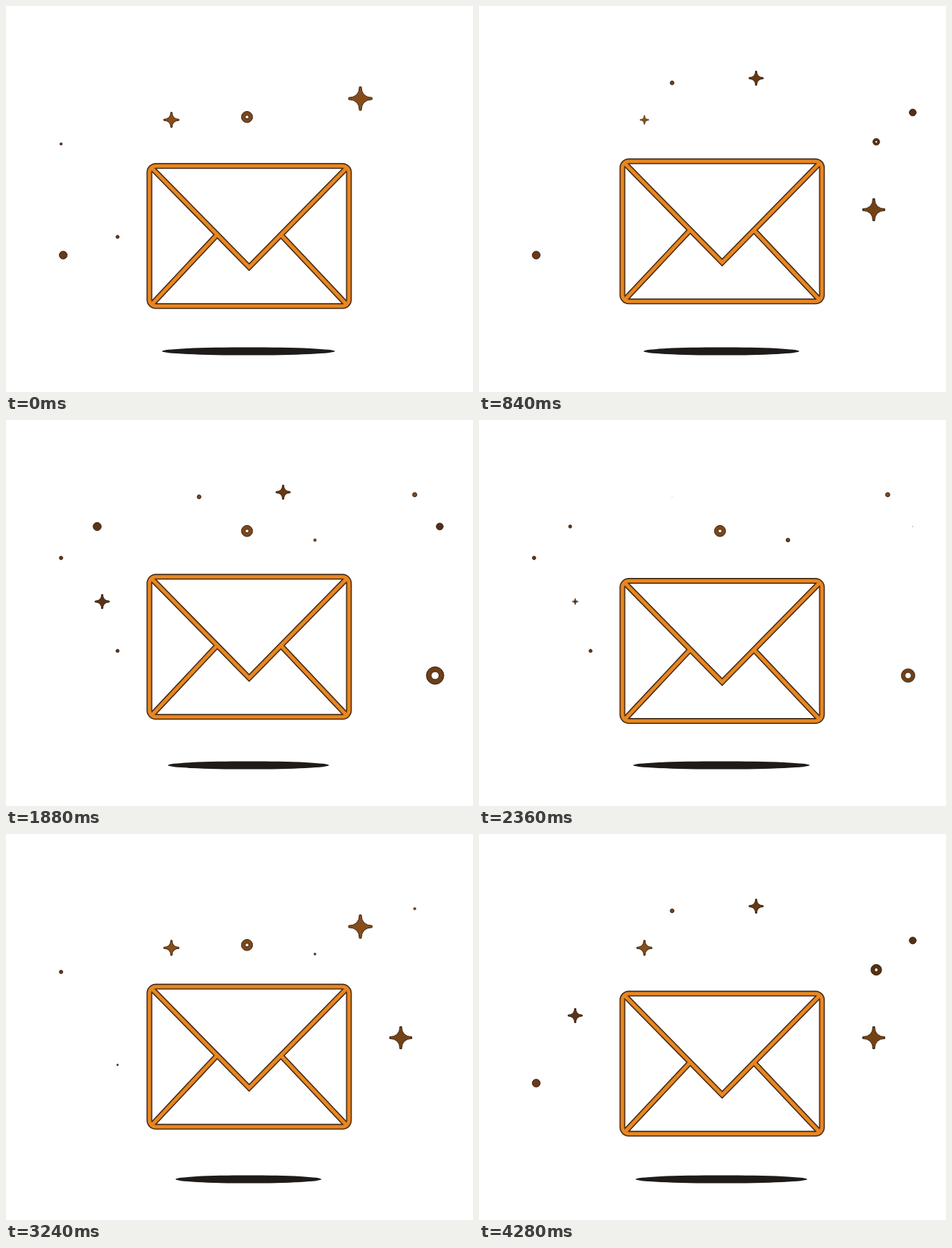
Recreate the animation shown at these times as an HTML page. Size 653 by 540 pixels, loop 4320 ms.

```html
<!DOCTYPE html>
<html lang="en">
<head>
<meta charset="utf-8">
<title>Floating envelope</title>
<style>
  html, body { margin: 0; width: 100%; height: 100%; overflow: hidden; background: #fff; }
  svg { display: block; width: 100vw; height: 100vh; }
</style>
</head>
<body>
<svg viewBox="0 0 653 540">
  <defs>
    <g id="outline" fill="none">
      <path d="M294-.5L204 95.5M385.5-.5L476 95.5" />
      <path d="M204-95L340 43.5L476-95" />
      <rect x="200.5" y="-98" width="279" height="196" rx="9" />
    </g>
  </defs>
  <ellipse id="shadow" cx="339" cy="483" ry="5.6" fill="#1f1b19" />
  <g id="envelope">
    <use href="#outline" stroke="#2a1709" stroke-width="8" />
    <use href="#outline" stroke="#b0621a" stroke-width="5.8" />
    <use href="#outline" stroke="#e88822" stroke-width="4" />
  </g>
  <g id="sparks" stroke="#38200f" stroke-linejoin="round" fill-rule="evenodd"></g>
</svg>
<script>
const LOOP = 4320, STEP = 40, POP = 200;
const BEFORE = -POP, AFTER = LOOP + POP;
const byId = id => document.getElementById(id);

const circle = r => `M${-r} 0a${r} ${r} 0 1 0 ${2 * r} 0a${r} ${r} 0 1 0 ${-2 * r} 0z`;
const shapes = {
  dot: circle,
  ring: r => circle(r) + circle(r < 10 ? 2.5 : r * 0.45),
  // four concave sides between blunt tips
  star: r => {
    const tip = r * 0.08, c = r * 0.1;
    return `M${tip} ${-r}Q${c} ${-c} ${r} ${-tip}V${tip}Q${c} ${c} ${tip} ${r}` +
      `H${-tip}Q${-c} ${c} ${-r} ${tip}V${-tip}Q${-c} ${-c} ${-tip} ${-r}z`;
  }
};

// shape, x, y, radius, colour, then pairs of appear/vanish times
const sparks = [
  ['dot', 77, 193, 2.4, '#6b3a1c', BEFORE, 130, 1050, 3450],
  ['dot', 80, 348.5, 5.5, '#6b3a18', BEFORE, 1500, 3480, AFTER],
  ['dot', 156, 323, 2.2, '#6b3a20', BEFORE, 800, 1600, 3350],
  ['dot', 127.5, 149, 5.7, '#5c3414', 850, 2450],
  ['dot', 270, 107.5, 2.7, '#75431f', 280, 2400, 3900, AFTER],
  ['dot', 432, 168, 2.6, '#75431f', 1750, 3350],
  ['dot', 571.5, 104.5, 3, '#7d4a1e', 1350, 3350],
  ['dot', 606.5, 149, 4.8, '#52301a', 200, 2400, 3680, AFTER],
  ['ring', 337, 155.3, 7.8, '#7d4718', BEFORE, 280, 1500, 3500],
  ['ring', 555.5, 190, 7.5, '#55310f', 220, 960, 3350, AFTER],
  ['ring', 600, 357.5, 12.2, '#6e3f18', 850, 2500],
  ['star', 231.3, 159.3, 10.6, '#8a4e16', BEFORE, 950, 2400, AFTER],
  ['star', 134.5, 254, 10, '#5a3418', 1050, 2450, 4050, AFTER],
  ['star', 387.5, 101, 10, '#66390f', 180, 2150, 3280, AFTER],
  ['star', 495.5, 129.5, 16.5, '#874d18', BEFORE, 300, 2350, 3500],
  ['star', 552, 285, 15.5, '#744214', 220, 1285, 2450, AFTER]
].map(([kind, x, y, r, fill, ...times]) => {
  const node = document.createElementNS('http://www.w3.org/2000/svg', 'path');
  node.setAttribute('d', shapes[kind](r));
  node.setAttribute('fill', fill);
  byId('sparks').append(node);
  return { node, x, y, times };
});

function scaleAt(times, t) {
  let scale = 0;
  for (let i = 0; i < times.length; i += 2) {
    const k = Math.min(1, (t - times[i]) / POP, (times[i + 1] - t) / POP);
    if (k > 0) scale = k * k * (3 - 2 * k);
  }
  return scale;
}

function draw(t) {
  const sway = Math.cos((t - 225) / LOOP * 4 * Math.PI);
  byId('envelope').setAttribute('transform', `translate(0 ${316.7 + 6.4 * sway})`);
  byId('shadow').setAttribute('rx', 111.5 + 12 * sway);
  for (const { node, x, y, times } of sparks) {
    const scale = scaleAt(times, t);
    node.setAttribute('visibility', scale ? 'visible' : 'hidden');
    node.setAttribute('transform', `translate(${x} ${y}) scale(${scale})`);
  }
}

const start = performance.now();
function tick() {
  const t = (performance.now() - start) % LOOP;
  draw(Math.floor(t / STEP) * STEP);
  requestAnimationFrame(tick);
}
tick();
</script>
</body>
</html>
```
